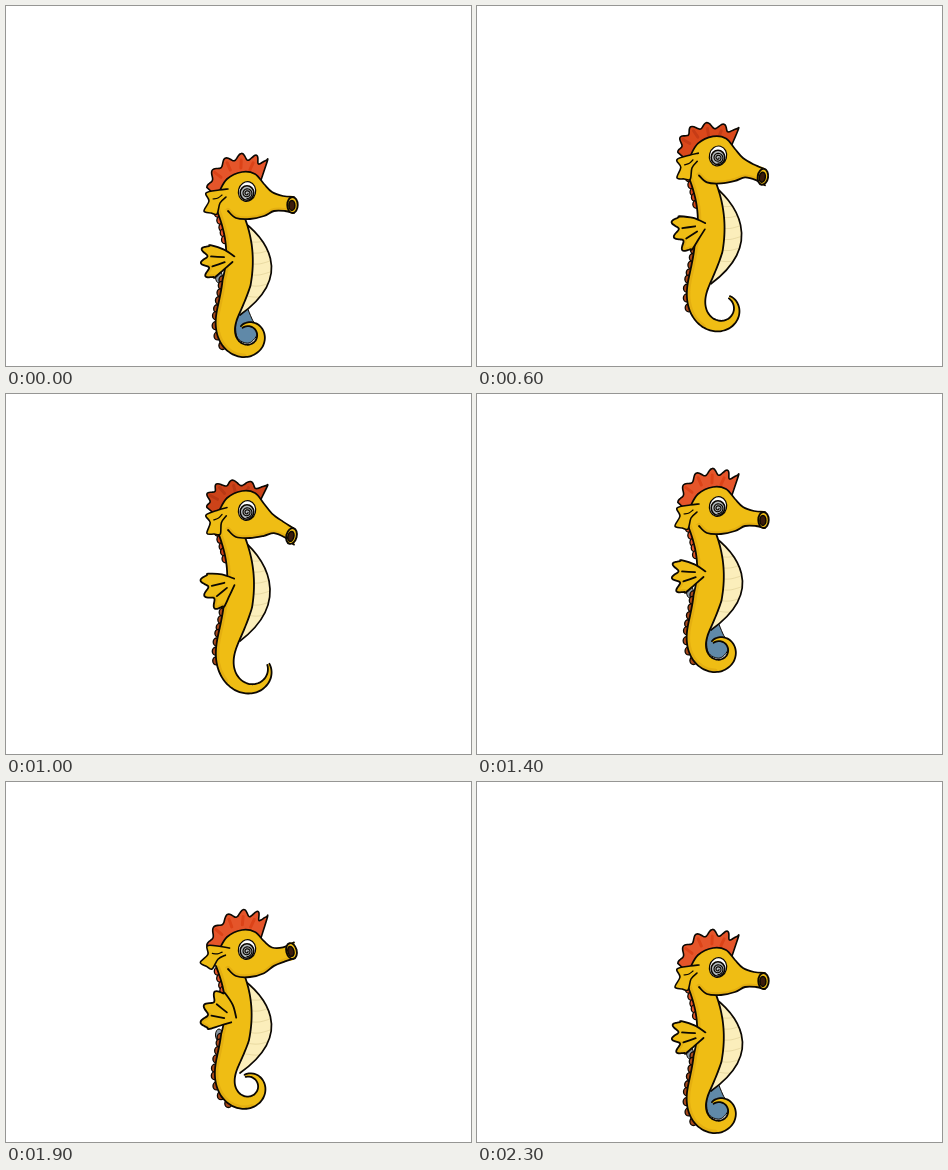
Write an HTML page with a canvas that moves like this. It is 465 by 360 pixels and loops after 2400 ms.

```html
<!DOCTYPE html>
<html lang="en">
<head>
<meta charset="utf-8">
<title>Seahorse</title>
<style>
html, body { margin: 0; width: 100%; height: 100%; overflow: hidden; background: #fff; }
canvas { display: block; }
</style>
</head>
<body>
<canvas id="stage" width="465" height="360"></canvas>
<script>
const ctx = document.getElementById('stage').getContext('2d');
const LOOP = 2400, STEP = 100, RAD = Math.PI / 180;
const INK = '#0c0803', GOLD = '#efbd14', SHADE = 'rgba(196,130,8,.25)';
const BLUE = '#6089a8', CREAM = '#fbeebb';

// Height of the eye, and the drag that bends every soft part (+ while rising)
const RISE = [[0, 187], [400, 168], [800, 133], [1000, 118], [1200, 117.5], [1400, 114], [1800, 160], [1900, 169], [2300, 187]];
const DRAG = [[0, 0], [400, .3], [800, .9], [1000, 1], [1200, .75], [1400, 0], [1900, -1], [2300, 0]];

// All x are stage positions, all y are measured from the eye.
const HEAD = [[210, 14], [213, -1], [221, -14], [236, -21], [249, -19], [258, -9], [266, -1], [277, 3], [288, 4],
  [288, 20], [279, 18], [268, 18], [258, 23], [244, 26], [230, 25], [222, 18]];
const EAR = [[3, -6], [-6, -5], [-19, -2], [-16, 6], [-21, 16], [-14, 18], [-8, 19], [-5, 8], [1, 2]];

const range = (n, f) => Array.from({ length: n + 1 }, (_, i) => f(i / n));
const smooth = u => u * u * (3 - 2 * u);

// Smooth curve through timed values, resting at each extreme
function track(keys, t) {
  const last = keys.length - 1;
  if (t >= keys[last][0]) return keys[last][1];
  const i = keys.findIndex((k, n) => t < keys[n + 1][0]);
  const rise = j => (keys[j + 1][1] - keys[j][1]) / (keys[j + 1][0] - keys[j][0]);
  const slope = j => {
    if (j === 0 || j === last) return 0;
    const a = rise(j - 1), b = rise(j);
    return a * b <= 0 ? 0 : 2 * a * b / (a + b);
  };
  const d = keys[i + 1][0] - keys[i][0], u = (t - keys[i][0]) / d, v = 1 - u;
  return keys[i][1] * v * v * (1 + 2 * u) + keys[i + 1][1] * u * u * (3 - 2 * u)
    + d * u * v * (slope(i) * v - slope(i + 1) * u);
}

function line(pts) {
  const path = new Path2D();
  const at = i => pts[Math.max(0, Math.min(pts.length - 1, i))];
  path.moveTo(...pts[0]);
  for (let i = 0; i < pts.length - 1; i++) {
    const a = at(i - 1), b = at(i), c = at(i + 1), d = at(i + 2);
    path.bezierCurveTo(b[0] + (c[0] - a[0]) / 6, b[1] + (c[1] - a[1]) / 6,
      c[0] - (d[0] - b[0]) / 6, c[1] - (d[1] - b[1]) / 6, c[0], c[1]);
  }
  return path;
}

function paint(path, fill, width = 1.7, ink = INK) {
  if (fill) { ctx.fillStyle = fill; ctx.fill(path); }
  if (width) { ctx.lineWidth = width; ctx.strokeStyle = ink; ctx.stroke(path); }
}

function oval(x, y, rx, ry, fill, width, turn = 0) {
  const p = new Path2D();
  p.ellipse(x, y, rx, ry, turn, 0, Math.PI * 2);
  paint(p, fill, width);
}

function within(path, drawInside) {
  ctx.save();
  ctx.clip(path);
  drawInside();
  ctx.restore();
}

// Walk down the trunk, then round the coil of the tail; one row per 2 px
function edges(drag) {
  const trunk = 115 + 8 * drag, tail = 105, all = trunk + tail;
  const coil = 335 - 65 * Math.abs(drag) - 45 * drag;
  const left = [], right = [];
  let x = 217, y = 3;
  for (let s = 0; s <= all; s += 2) {
    const u = Math.max(0, (s - trunk) / tail), v = s / all;
    const turn = RAD * (24 - 42 * smooth(Math.min(1, s / trunk)) + coil * u ** 1.7);
    const w = Math.min(11 + 8 * v, 1.2 + 22 * (1 - v));
    const dx = Math.sin(turn), dy = Math.cos(turn);
    left.push([x - dy * w, y + dx * w]);
    right.push([x + dy * w, y - dx * w]);
    x += dx * 2;
    y += dy * 2;
  }
  return [left, right];
}

function drawBack(left, red, spread) {
  if (spread > 0) {
    ctx.save();
    ctx.translate(235, 122);
    ctx.scale(spread, spread);
    paint(line([[6, -8], [-4, 2], [-4, 22], [8, 28], [17, 17], [11, 4], [6, -8]]), BLUE, 1);
    ctx.restore();
  }
  oval(213, 84, 3.5, 6, '#8b98a5', 1);
  for (let s = 14; s < 156; s += 7.5) {
    if (s > 50 && s < 86) continue;
    const [x, y] = left[Math.round(s / 2)];
    oval(x, y, 3.6, 4, s < 50 ? red : '#a8481c', 1.3);
  }
}

// Six waves round the crown, pressed down and swept back by the drag
function drawCrest(drag, red, dark) {
  const flat = drag > 0 ? drag : drag / 4;
  const ray = (u, r) => {
    const a = RAD * (172 - 150 * u + 27 * u ** 3);
    return [234 + r * Math.cos(a) - 10 * flat * Math.sin(Math.PI * u) * r / 40,
      -1 - r * Math.sin(a) * (1 - .2 * flat)];
  };
  const rim = range(60, u => ray(u, 29.5 + 4.5 * u + (4 + 4 * u) * (.5 + .5 * Math.cos(10 * Math.PI * u))));
  const p = line([...rim, [255, -13]]);
  p.lineTo(235, -5);
  p.lineTo(211, 4);
  p.closePath();
  paint(p, red, 1.6);
  within(p, () => {
    for (let u = .2; u < 1; u += .2) paint(line([ray(u, 24), ray(u, 32)]), null, 3, dark);
  });
}

function drawBelly(drag) {
  const drop = 7 * Math.max(0, drag);
  const edge = new Path2D();
  edge.moveTo(231, 24);
  edge.bezierCurveTo(260, 44, 290 - drop / 2, 82 + drop, 234, 122 + drop);
  const p = new Path2D(edge);
  p.lineTo(224, 105);
  p.lineTo(225, 35);
  paint(p, CREAM, 0);
  within(p, () => {
    for (let y = 46; y < 112; y += 11)
      paint(line([[240, y + 2], [253, y + 3], [270, y - 2]]), null, 1, 'rgba(205,188,125,.4)');
  });
  paint(edge);
}

function drawBody(left, right) {
  const p = line([...left, ...right.slice().reverse()]);
  paint(p, GOLD, 0);
  within(p, () => paint(line(left.slice(0, 85)), null, 7, SHADE));
  paint(line(left.slice(4)), null, 1.8);
  paint(line(right.slice(6)), null, 1.8);
}

function drawHead(drag) {
  const bend = x => 12 * drag * Math.max(0, (x - 248) / 39) ** 2;
  const pts = HEAD.map(([x, y]) => [x, y + bend(x)]), p = line(pts);
  p.closePath();
  paint(p, GOLD, 0);
  within(p, () => paint(line(pts.slice(9)), null, 6, SHADE));
  paint(line(pts.slice(1, 9)));
  paint(line(pts.slice(9)), null, 1.8);
  const x = 286.5 - Math.abs(drag), y = 12 + bend(287), turn = drag * .25;
  oval(x, y, 5.2, 8, GOLD, 1.9, turn);
  oval(x - .6, y + .4, 3, 5, '#3b1c0a', 1.5, turn);
}

// A fan of three lobes
function drawFin(swing) {
  const bend = Math.abs(swing), half = .585 + .25 * bend;
  const ray = (u, r) => {
    const a = swing - .135 + half * (1 - 2 * u);
    return [231 - r * Math.cos(a), 65 + 8 * bend - r * Math.sin(a)];
  };
  const rim = range(30, u => ray(u, 33 - 3.5 * Math.cos(6 * Math.PI * u)));
  const p = line([ray(-.1, 3), ray(-.1, 16), ...rim, ray(1, 18), ray(1, 6)]);
  paint(p, GOLD, 0);
  within(p, () => paint(line(rim.slice(20)), null, 6, SHADE));
  paint(p, null, 1.8);
  for (const u of [1 / 3, 2 / 3]) paint(line([ray(u, 26), ray(u, 13)]), null, 1.8);
}

function drawEar(turn) {
  ctx.save();
  ctx.translate(219, 2);
  ctx.rotate(turn);
  paint(line(EAR), GOLD, 1.6);
  paint(line([[-12, 4], [-7, 3], [-3, 0]]), null, 1.2);
  ctx.restore();
}

function drawEye() {
  oval(241, -1.5, 8.6, 10, '#fff', 1.2, .25);
  oval(241, 0, 6.8, 7.2, '#b4babd', 1.6);
  paint(line(range(40, u => {
    const a = u * Math.PI * 4.5, r = 1 + 4.4 * u;
    return [241 + r * Math.cos(a), .3 + r * Math.sin(a)];
  })), null, 1.2);
}

function draw(t) {
  const drag = track(DRAG, t);
  const swing = -.45 * drag + .12 * drag * drag;
  const light = 53 - 8 * Math.max(0, drag);
  const red = `hsl(14 78% ${light}%)`, dark = `hsl(13 80% ${light - 5}%)`;
  const [left, right] = edges(drag);

  ctx.setTransform(1, 0, 0, 1, 0, 0);
  ctx.fillStyle = '#fff';
  ctx.fillRect(0, 0, 465, 360);
  ctx.lineCap = ctx.lineJoin = 'round';
  ctx.translate(0, track(RISE, t));
  drawBack(left, red, 1 - 3 * Math.abs(drag));
  drawCrest(drag, red, dark);
  drawBelly(drag);
  drawBody(left, right);
  drawHead(drag);
  drawEar(swing * .5);
  drawFin(swing);
  drawEye();
}

const start = performance.now();
function tick() {
  const t = (performance.now() - start) % LOOP;
  draw(Math.floor(t / STEP) * STEP);
  requestAnimationFrame(tick);
}
tick();
</script>
</body>
</html>
```
